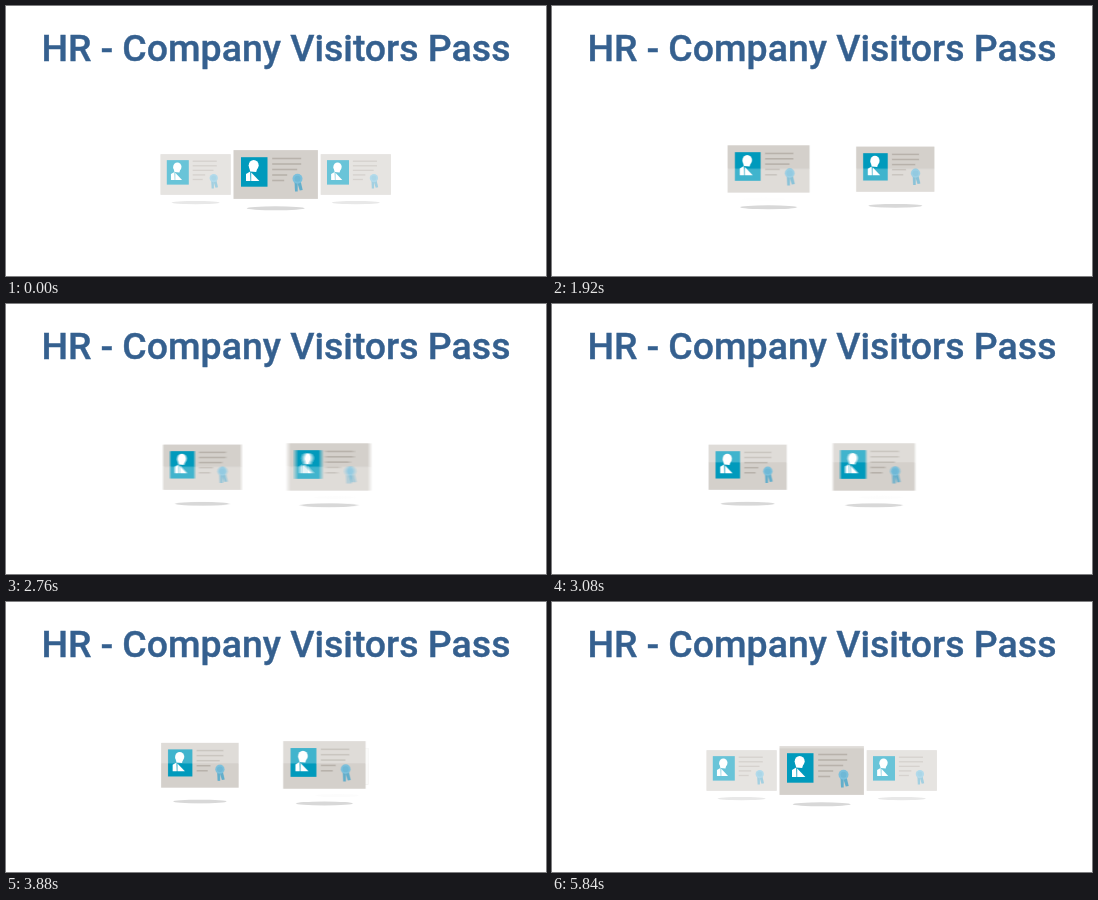
An HTML page with a canvas that plays this animation: 540 by 270 pixels, repeating every 5.88 s.

```html
<!DOCTYPE html>
<html lang="en">
<head>
<meta charset="utf-8">
<title>Visitors Pass</title>
<style>
html, body { margin: 0; width: 100%; height: 100%; overflow: hidden; background: #fff; }
canvas { position: absolute; left: 0; top: 0; }
h1 {
  position: absolute; left: 0; top: 0; width: 540px; margin: 0;
  font: 500 37.4px/85px Barlow, Roboto, sans-serif;
  -webkit-text-stroke: .4px #35608f;
  text-align: center; white-space: nowrap; color: #35608f;
}
</style>
</head>
<body>
<canvas id="stage" width="540" height="270"></canvas>
<h1>HR - Company Visitors Pass</h1>
<script>
const LOOP = 5880, FRAME = 40, SWEEP = LOOP / 7, MIDDLE = 2876;
const CX = 269.7, CY = 168.5, RADIUS = 96.5;
const BLUE = '#009abc';

const stage = document.getElementById('stage').getContext('2d');
const layer = document.createElement('canvas');
layer.width = 540;
layer.height = 270;
const g = layer.getContext('2d');

const clamp = x => Math.max(0, Math.min(1, x));
const smooth = x => x * x * (3 - 2 * x);

// One full turn in degrees: cubic start and end, steady fast middle
function turn(t) {
  const x = t - MIDDLE, away = Math.abs(x);
  const rest = (Math.max(0, 2373 - away) / 435) ** 3;
  return 180 + Math.sign(x) * Math.min(0.3 * away, 180 - rest);
}

// Cards float up while turning
const lift = t => -5.7 * smooth(clamp((2400 - Math.abs(t - MIDDLE)) / 1100));

// Lower edge of the rising glare band
const glareEdge = t => 146 + 76 * (1 - t % SWEEP / SWEEP) ** 1.65;

function rect(color, x, y, w, h) {
  g.fillStyle = color;
  g.fillRect(x, y, w, h);
}

function ellipse(color, x, y, rx, ry) {
  g.fillStyle = color;
  g.beginPath();
  g.ellipse(x, y, rx, ry, 0, 0, 7);
  g.fill();
}

function polygon(color, ...points) {
  g.fillStyle = color;
  g.beginPath();
  points.forEach(p => g.lineTo(...p));
  g.fill();
}

function drawPortrait() {
  rect(BLUE, -34.7, -17.3, 26.5, 29.5);
  ellipse('#fff', -22, -9.2, 5, 5.3);
  polygon('#fff', [-27, -9], [-18, -8], [-19.5, -2.5], [-25.5, -3]);
  polygon('#fff', [-29.7, 6.5], [-29.7, -0.5], [-25.5, -3], [-25.2, 6.5]);
  polygon('#fff', [-24.5, -2], [-16.3, 6.5], [-24.5, 6.5]);
}

function drawRibbon() {
  polygon('#62aecb', [18.8, 7], [22, 8], [22, 17], [19.3, 17]);
  polygon('#62aecb', [21.5, 8], [25, 7], [27, 15.5], [24, 16]);
  ellipse('#7cc0dc', 21.8, 4.3, 5, 5);
  ellipse('#6fb8d6', 21.8, 4.3, 3, 3);
}

function drawCard(bob, alpha) {
  g.globalAlpha = alpha;
  ellipse('#d8d8d8', 0, 33.8, 29, 2);
  g.globalAlpha = 1;

  g.translate(0, bob);
  rect('#d4d0cb', -42.2, -24.4, 84.4, 48.8);
  drawPortrait();
  [29, 29, 25, 15, 12].forEach((w, i) => rect('#b8b2ab', -3.5, 5.5 * i - 16.8, w, 1.6));
  drawRibbon();
  // White veil fades the card as a whole
  rect(`rgba(255,255,255,${1 - alpha})`, -42.2, -24.4, 84.4, 48.8);
}

function drawScene(t) {
  rect('#fff', 0, 0, 540, 270);
  const angle = turn(t), bob = lift(t);
  [0, 1, 2, 3]
    .map(i => (i * 90 - angle) * Math.PI / 180)
    .sort((a, b) => Math.cos(a) - Math.cos(b))
    .forEach(a => {
      const depth = Math.cos(a);
      const alpha = clamp(0.59 + depth);
      if (alpha < 0.02) return;
      const scale = 0.83 + 0.17 * depth;
      g.save();
      g.translate(CX + RADIUS * scale * Math.sin(a), CY);
      g.scale(scale, scale);
      drawCard(bob, alpha);
      g.restore();
    });

  const bottom = glareEdge(t), top = bottom - 27;
  rect('rgba(255,255,255,.25)', 140, top, 260, Math.max(0, Math.min(bottom, 194) - top));
}

function draw(now) {
  const t = Math.floor(now % LOOP / FRAME) * FRAME;
  // Average nearby moments for motion blur
  for (let i = 0; i < 5; i++) {
    drawScene(Math.max(0, t + 3 * (i - 2)));
    stage.globalAlpha = 1 / (i + 1);
    stage.drawImage(layer, 0, 0);
  }
}

let start;
function tick(now) {
  start ??= now;
  draw(now - start);
  requestAnimationFrame(tick);
}
draw(0);
requestAnimationFrame(tick);
</script>
</body>
</html>
```
